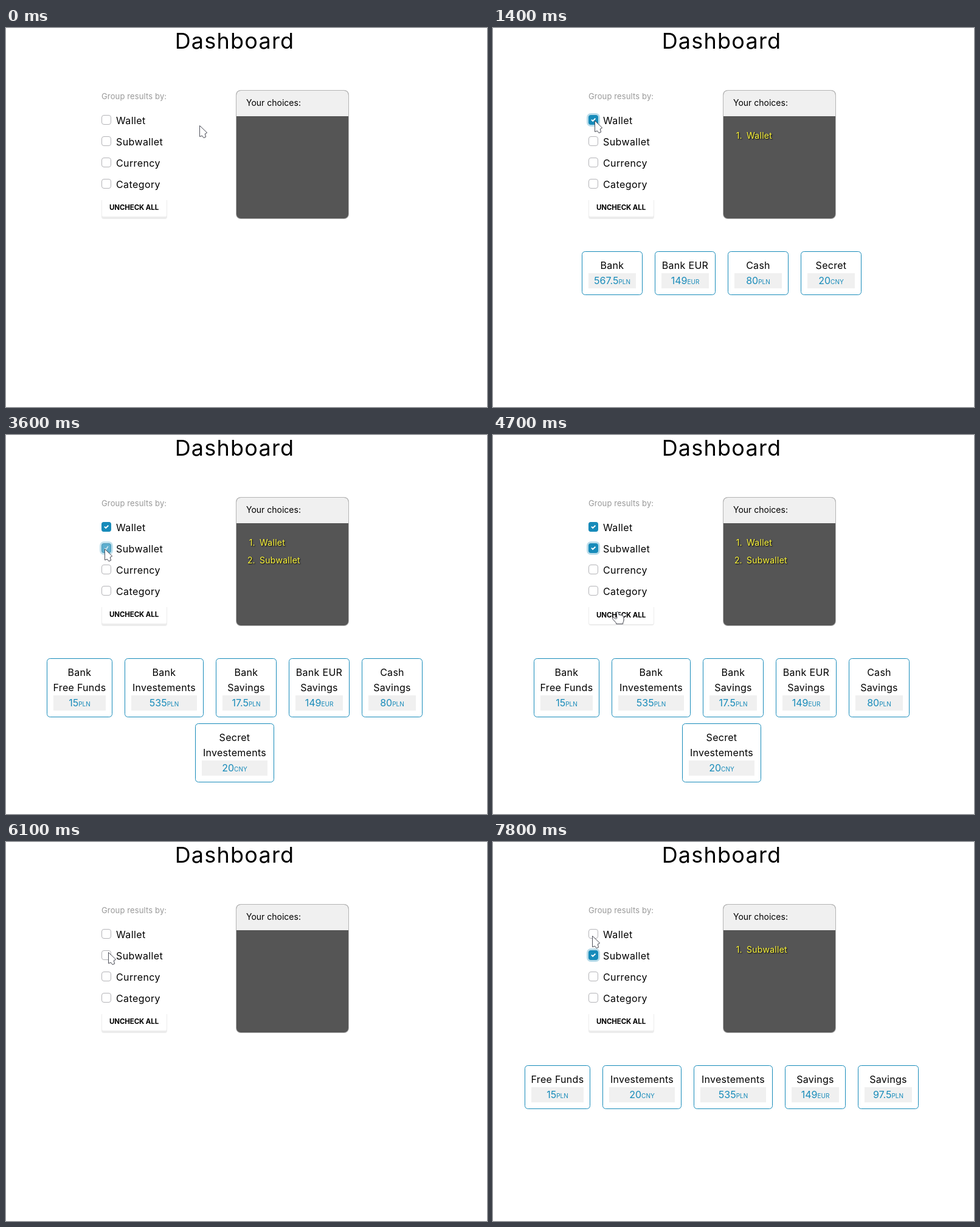
Write an HTML page with a canvas that moves like this. It is 791 by 623 pixels and loops after 8000 ms.

```html
<!DOCTYPE html>
<html lang="en">
<head>
<meta charset="utf-8">
<title>Dashboard</title>
<style>
  html, body { margin: 0; width: 100%; height: 100%; overflow: hidden; background: #fff; }
  canvas { display: block; width: 791px; height: 623px; }
</style>
</head>
<body>
<canvas id="stage" width="791" height="623"></canvas>
<script>
const ctx = document.getElementById('stage').getContext('2d');
const LOOP = 8000, STEP = 100;
const BLUE = '#178bba', PALE = '#f0f0f0';

// periods during which the picture is refreshed; it rests in between
const ACTIVE = [[0, 0], [200, 800], [1100, 1400], [2100, 2400], [2700, 2700], [3500, 3700],
  [4500, 4800], [5000, 5100], [5400, 6100], [6600, 6700], [6900, 6900], [7300, 7500], [7700, 7800]];

// pointer path: time, x, y
const PATH = [
  [0, 318, 160], [100, 318, 160], [400, 262, 151], [600, 198, 143], [800, 166, 151],
  [1000, 166, 151], [1100, 167, 152], [2000, 167, 152], [2200, 184, 171], [2400, 163, 187],
  [2600, 163, 187], [2700, 162, 187], [4400, 162, 187], [4600, 190, 262], [4700, 205, 290],
  [4800, 206, 297], [5000, 206, 296], [5100, 207, 295], [5500, 207, 295], [5800, 196, 240],
  [6100, 168, 181], [7200, 168, 181], [7300, 172, 176], [7400, 168, 166], [7500, 163, 157],
  [7700, 163, 156], [7800, 163, 154]];

const OPTIONS = ['Wallet', 'Subwallet', 'Currency', 'Category'];

// card: title lines, amount, unit, width
const byWallet = [[
  ['Bank', '567.5', 'PLN', 100], ['Bank EUR', '149', 'EUR', 100],
  ['Cash', '80', 'PLN', 100], ['Secret', '20', 'CNY', 100]]];
const byBoth = [[
  ['Bank|Free Funds', '15', 'PLN', 108], ['Bank|Investements', '535', 'PLN', 130],
  ['Bank|Savings', '17.5', 'PLN', 100], ['Bank EUR|Savings', '149', 'EUR', 100],
  ['Cash|Savings', '80', 'PLN', 100]],
  [['Secret|Investements', '20', 'CNY', 130]]];
const bySub = [[
  ['Free Funds', '15', 'PLN', 108], ['Investements', '20', 'CNY', 130],
  ['Investements', '535', 'PLN', 130], ['Savings', '149', 'EUR', 100],
  ['Savings', '97.5', 'PLN', 100]]];

const STATES = [
  { at: -9000, picks: [], focus: -1, rows: [] },
  { at: 1080, picks: [0], focus: 0, rows: byWallet },
  { at: 3480, picks: [0, 1], focus: 1, rows: byBoth },
  { at: 5370, picks: [], focus: -1, rows: [] },
  { at: 6550, picks: [1], focus: 1, rows: bySub }];

const clamp = v => Math.max(0, Math.min(1, v));
const easeOut = v => 1 - (1 - clamp(v)) ** 2.3;

function snap(t) {
  const [, end] = ACTIVE.filter(a => a[0] <= t).pop();
  return Math.min(Math.floor(t / STEP) * STEP, end);
}

function pointerAt(t) {
  const i = PATH.findIndex(p => p[0] > t);
  if (i < 0) return PATH[PATH.length - 1].slice(1);
  const [t0, x0, y0] = PATH[i - 1], [t1, x1, y1] = PATH[i];
  const k = (t - t0) / (t1 - t0);
  return [Math.round(x0 + (x1 - x0) * k), Math.round(y0 + (y1 - y0) * k)];
}

function setFont(size, spacing = 0, weight = 400) {
  ctx.font = `${weight} ${size}px Inter, "Open Sans", sans-serif`;
  ctx.letterSpacing = `${(size * spacing).toFixed(2)}px`;
}

function text(str, x, y, size, color = '#000', align = 'left', spacing = 0.02, weight = 400) {
  setFont(size, spacing, weight);
  ctx.textAlign = align;
  ctx.fillStyle = color;
  ctx.fillText(str, x, y);
}

function box(x, y, w, h, r, fill, stroke) {
  ctx.beginPath();
  ctx.roundRect(x, y, w, h, r);
  if (fill) { ctx.fillStyle = fill; ctx.fill(); }
  if (stroke) { ctx.strokeStyle = stroke; ctx.lineWidth = 1; ctx.stroke(); }
}

function checkbox(i, t, now, before) {
  const y = 143 + 35 * i, age = t - now.at;
  const on = now.picks.includes(i), was = before.picks.includes(i);
  const p = easeOut(age / 300);
  const level = on === was ? +on : on ? p : 1 - p;

  if (now.focus === i) {
    ctx.globalAlpha = 0.3 * easeOut(age / 200);
    ctx.beginPath();
    ctx.roundRect(154, y - 3, 22, 22, 7);
    ctx.roundRect(157, y, 16, 16, 4);
    ctx.fillStyle = BLUE;
    ctx.fill('evenodd');
    ctx.globalAlpha = 1;
  }
  box(157.5, y + 0.5, 15, 15, 3.5, '#fff', '#b4b4b8');
  ctx.globalAlpha = level;
  box(157, y, 16, 16, 4, BLUE);
  ctx.globalAlpha = 1;
  if (!on && level > 0) box(157.5, y + 0.5, 15, 15, 3.5, null, `rgba(70,130,165,${Math.min(1, level * 2)})`);

  if (on) {
    ctx.save();
    ctx.translate(165, y + 7.7);
    ctx.rotate(was ? 0 : -0.4 * (1 - easeOut(age / 500)));
    ctx.globalAlpha = level;
    ctx.beginPath();
    ctx.moveTo(-3.1, 0);
    ctx.lineTo(-0.9, 2.2);
    ctx.lineTo(3.4, -2);
    ctx.strokeStyle = '#fff';
    ctx.lineWidth = 1.9;
    ctx.stroke();
    ctx.restore();
  }
  text(OPTIONS[i], 181, y + 15, 16, '#000', 'left', 0.025);
}

function button(hover) {
  const lift = hover ? 1 : 0;
  box(157, 283, 108, 31 - lift, [0, 0, 4, 4], '#ececec');
  box(158, 281, 106, 29 + lift, [0, 0, 2, 2], '#fff');
  text('UNCHECK ALL', 170, 299 + lift, 11.5, '#000', 'left', -0.01, 700);
}

function panel(picks) {
  box(378, 102, 186, 212, 8, '#b4b4b4');
  box(379, 103, 184, 210, 7, '#555');
  box(379, 103, 184, 42, [7, 7, 0, 0], PALE);
  text('Your choices:', 395, 128, 14, '#000', 'left', 0);

  ctx.save();
  ctx.shadowColor = '#000';
  ctx.shadowBlur = 2;
  ctx.shadowOffsetX = ctx.shadowOffsetY = 1;
  picks.forEach((pick, i) => {
    const y = 182 + 29 * i;
    text(`${i + 1}.`, 409.5, y, 14, '#fff838', 'right', 0);
    text(OPTIONS[pick], 417, y, 14, '#fff838');
  });
  ctx.restore();
}

function card([title, amount, unit, w], x, y) {
  const lines = title.split('|'), mid = x + w / 2;
  const base = y + 4 + 25 * lines.length;
  box(x + 0.5, y + 0.5, w - 1, 46 + 25 * lines.length, 5, '#fff', BLUE);
  lines.forEach((line, i) => text(line, mid, y + 29 + 25 * i, 16, '#000', 'center', 0.018));
  ctx.fillStyle = PALE;
  ctx.fillRect(x + 11, base + 7, w - 22, 25);

  setFont(16);
  const wide = ctx.measureText(amount).width;
  setFont(10);
  const left = mid - (wide + ctx.measureText(unit).width) / 2;
  text(amount, left, base + 25, 16, BLUE, 'left', 0);
  text(unit, left + wide, base + 25, 10, BLUE, 'left', 0);
}

function cards(rows) {
  rows.forEach((row, r) => {
    let x = 376 - (row.reduce((sum, c) => sum + c[3] + 20, -20)) / 2;
    for (const c of row) {
      card(c, x, 367 + 107 * r);
      x += c[3] + 20;
    }
  });
}

const ARROW = new Path2D('M.5 .5L12.5 12L9.2 14L10.5 19L7 20.5L4.5 17L.5 18.5Z');
const HAND = new Path2D('M-2 1.5Q-.5-.5 1 1.2L2.2 6Q4 4.8 5 6.4Q7 5.4 7.8 7.2Q9.6 6.8 9.8 8.8' +
  'L10 14Q9.8 17 8.6 18.5V20.5H-2.5V18.8L-8.3 12.4Q-9 10.2-7 10L-2.8 12.3L-1 11Z');

function pointer(x, y, hand) {
  ctx.save();
  ctx.translate(x, y);
  ctx.shadowColor = 'rgba(0,0,0,.25)';
  ctx.shadowBlur = 1.5;
  ctx.shadowOffsetX = ctx.shadowOffsetY = 0.5;
  const shape = hand ? HAND : ARROW;
  ctx.fillStyle = '#fff';
  ctx.fill(shape);
  ctx.shadowColor = 'transparent';
  ctx.strokeStyle = '#50525c';
  ctx.lineWidth = 1;
  ctx.lineJoin = 'round';
  ctx.stroke(shape);
  ctx.restore();
}

function draw(t) {
  const n = STATES.filter(s => s.at <= t).length - 1;
  const now = STATES[n], before = STATES[Math.max(0, n - 1)];
  const [x, y] = pointerAt(t);
  const hover = x >= 157 && x < 265 && y >= 281 && y < 314;

  ctx.fillStyle = '#fff';
  ctx.fillRect(0, 0, 791, 623);
  text('Dashboard', 376, 34, 36, '#000', 'center', 0.034);
  text('Group results by:', 157, 117, 13, '#999', 'left', 0.01);
  OPTIONS.forEach((_, i) => checkbox(i, t, now, before));
  button(hover);
  panel(now.picks);
  cards(now.rows);
  pointer(x, y, hover);
}

const start = performance.now();
function frame() {
  draw(snap((performance.now() - start) % LOOP));
  requestAnimationFrame(frame);
}
frame();
</script>
</body>
</html>
```
